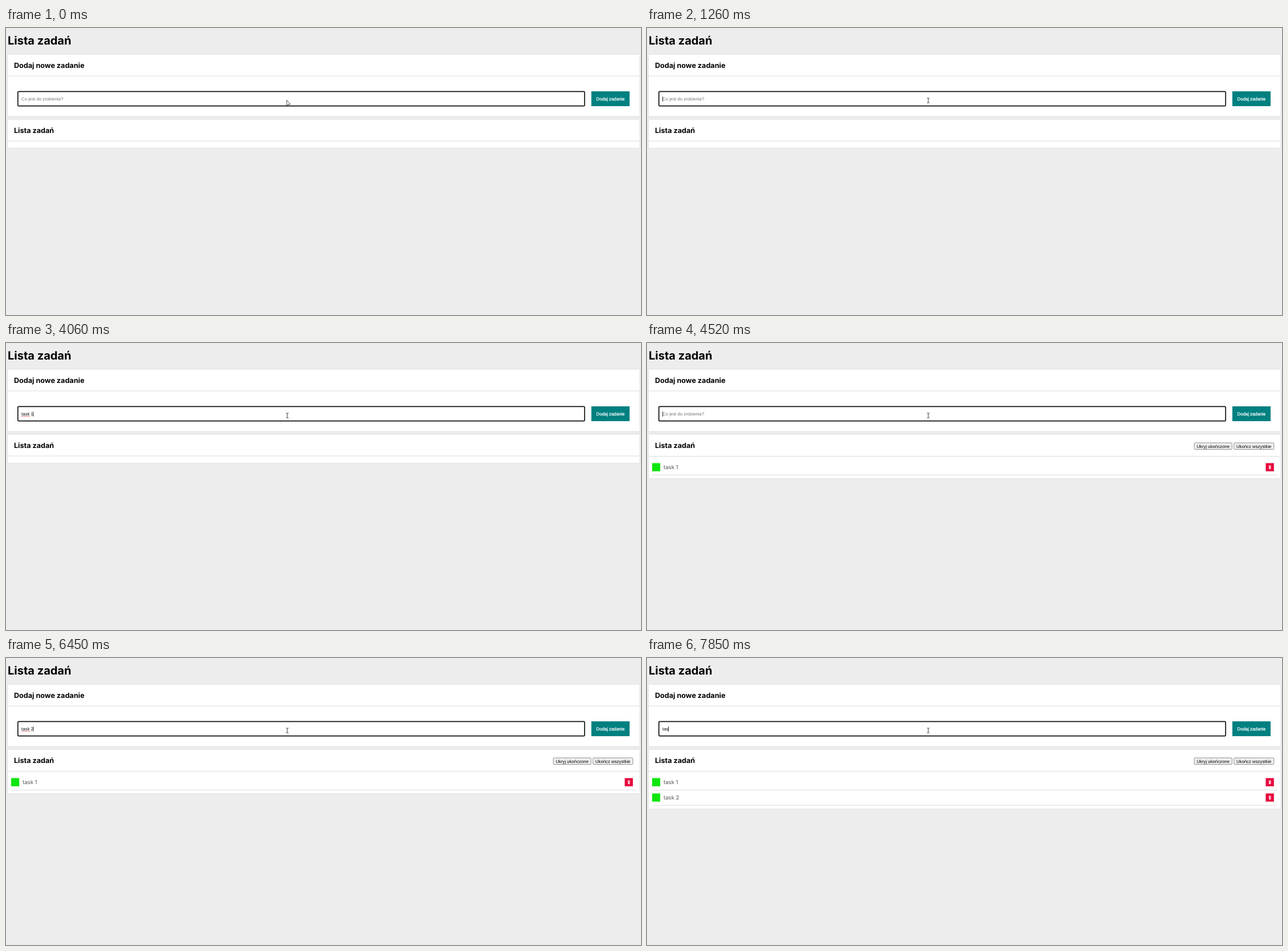
Write an HTML page that moves like this. It is 1113 px wide and 503 px high and loops after 8000 ms.

```html
<!DOCTYPE html>
<html lang="pl">
<head>
<meta charset="utf-8">
<style>
  html, body { margin: 0; width: 100%; height: 100%; overflow: hidden; background: #ededed; }
  svg { display: block; }
  text { white-space: pre; text-rendering: geometricPrecision; }
  .head { font: 700 12.6px Inter, sans-serif; }
  .form { font: 7.8px "Liberation Sans", Arial, sans-serif; }
  .task { font: 9.6px Inter, sans-serif; fill: #555; }
  .note { font: 7.2px "Open Sans", sans-serif; fill: #333; }
  .small { font-size: 6.7px; }
  .mid { text-anchor: middle; }
  .card { fill: #fff; filter: drop-shadow(0 0 1px #d4d4d4); }
  .rule { fill: #e2e2e2; }
  .grey { fill: #efefef; stroke: #767676; stroke-width: .8; }
  #dialog { filter: drop-shadow(0 1px 2px rgba(0, 0, 0, .45)); }
</style>
</head>
<body>
<svg width="1113" height="503" viewBox="0 0 1113 503">
  <text x="3" y="29" class="head" style="font-size:20px">Lista zadań</text>

  <rect class="card" x="3" y="46.5" width="1107.5" height="108"/>
  <text x="14" y="69.5" class="head">Dodaj nowe zadanie</text>
  <rect class="rule" x="3" y="83.4" width="1107.5" height="1.2"/>
  <rect id="field" fill="#fff"/>
  <text id="value" x="27" y="127" class="form"></text>
  <path id="spell" d="M27 128.5H42" stroke="#e33" stroke-width="1" stroke-dasharray="1.2 .8"/>
  <rect id="caret" y="120" width=".9" height="9" fill="#222"/>
  <rect x="1026" y="111" width="67" height="26" fill="teal"/>
  <text id="add" x="1059.5" y="127" class="form mid" fill="#fff" stroke="#fff">Dodaj zadanie</text>

  <rect id="listCard" class="card" x="3" y="160.5" width="1107.5"/>
  <g id="listHead">
    <text x="14" y="183.5" class="head">Lista zadań</text>
    <rect class="rule" x="3" y="197.4" width="1107.5" height="1.2"/>
  </g>
  <g id="tools" class="form mid">
    <rect class="grey" x="959.2" y="175" width="66.2" height="11.5" rx="1.5"/>
    <text x="992.2" y="183.5">Ukryj ukończone</text>
    <rect class="grey" x="1028.8" y="175" width="70" height="11.5" rx="1.5"/>
    <text x="1063.7" y="183.5">Ukończ wszystkie</text>
  </g>
  <g id="rows"></g>

  <g id="dialog">
    <rect x="426.5" y="-10" width="260.5" height="100" rx="2" fill="#fff"/>
    <g class="note">
      <text x="435.5" y="13.5">Możesz poruszać się po stronach przy użyciu kursora tekstowego. Aby</text>
      <text x="435.5" y="25">wyłączyć tę opcję, naciśnij F7.</text>
      <rect x="437.4" y="37.2" width="6.2" height="6.2" rx=".6" fill="none" stroke="#5f6368" stroke-width="1.2"/>
      <text x="452" y="42.6" class="small">Nie pytaj ponownie</text>
      <rect x="593.9" y="61.9" width="39.7" height="18.2" rx="2.5" fill="#fff" stroke="#1a73e8" stroke-width="1.2"/>
      <rect x="595.3" y="63.3" width="36.9" height="15.4" rx="1.5" fill="#1a73e8"/>
      <text x="613.7" y="73.4" class="small mid" style="fill:#fff;font-weight:700">Włącz</text>
      <rect x="638.5" y="62" width="39" height="18" rx="2" fill="#fff" stroke="#dadce0"/>
      <text x="658" y="73.4" class="small mid" style="fill:#4380d0">Anuluj</text>
    </g>
  </g>

  <path id="arrow" d="M492 126.5V136.3L494.3 134.2L495.5 136.8L496.9 136.2L495.8 133.6H498.2Z" fill="#fff" stroke="#222" stroke-width=".8"/>
  <path id="beam" d="M490.8 122.9H492.4L493 123.5L493.6 122.9H495.2M493 123.5V130.5M490.8 131.1H492.4L493 130.5L493.6 131.1H495.2" fill="none" stroke="#222" stroke-width=".9"/>
</svg>
<script>
const LOOP = 8000;
const $ = id => document.getElementById(id);
const show = (id, on) => $(id).style.display = on ? '' : 'none';
const set = (el, attrs) => { for (const k in attrs) el.setAttribute(k, attrs[k]); };

// start time, typed text, caret visible
const steps = [
  [0, '', 0], [1260, '', 1], [1800, '', 0],
  [2330, 't', 1], [2530, 'ta', 1], [2730, 'tas', 1], [2930, 'task', 1], [3460, 'task', 0],
  [3860, 'task ', 1], [4060, 'task 1', 1], [4520, '', 1], [4590, '', 0], [5120, '', 1],
  [5320, 't', 1], [5580, 'ta', 1], [5780, 'tas', 1], [5980, 'task', 1],
  [6180, 'task ', 1], [6450, 'task 2', 1], [6780, '', 1], [6980, '', 0],
  [7440, 't', 1], [7650, 'ta', 1], [7850, 'tas', 1]
];

const row = n => `<g transform="translate(0 ${(n - 1) * 26.9})">
  <rect x="9" y="210.5" width="14.2" height="14.3" fill="#0ee60e"/>
  <text x="29" y="221.2" class="task">task ${n}</text>
  <rect x="1084.5" y="210.5" width="14.3" height="14.3" fill="#e6063c"/>
  <path d="M1089.5 215.6H1094M1091 214.9H1092.5" stroke="#fff" stroke-width=".9"/>
  <path d="M1089.9 216.6H1093.6L1093.3 221H1090.2Z" fill="#fff"/>
  <path d="M1091.2 217.3V220.3M1092.3 217.3V220.3" stroke="#e6063c" stroke-width=".4"/>
  <rect class="rule" x="9" y="230.8" width="1095.5" height="1.2"/></g>`;
$('rows').innerHTML = row(1) + row(2);

function draw(t) {
  const [, text, caret] = steps.findLast(s => s[0] <= t);
  const count = t < 4520 ? 0 : t < 6780 ? 1 : 2;
  const focused = t < 70 || t >= 1260;

  set($('field'), focused
    ? { x: 20.8, y: 111.3, width: 993.4, height: 25.4, rx: 1.5, stroke: '#101010', 'stroke-width': 1.7 }
    : { x: 21, y: 111.5, width: 993, height: 25, rx: 0, stroke: '#ccc', 'stroke-width': 1.1 });
  $('value').textContent = text || 'Co jest do zrobienia?';
  set($('value'), { fill: text ? '#111' : '#757575' });
  set($('add'), { 'stroke-width': focused ? .25 : .08 });
  set($('caret'), { x: text ? 26.7 + $('value').getComputedTextLength() : 27 });
  show('caret', caret);
  show('spell', text.length > 4);

  set($('listCard'), { height: count ? 49.6 + count * 26.9 : 49.5 });
  set($('listHead'), { transform: `translate(0 ${count ? .6 : 0})` });
  show('tools', count);
  [...$('rows').children].forEach((r, i) => r.style.display = i < count ? '' : 'none');

  show('dialog', !focused);
  $('dialog').style.opacity = Math.min(1, (Math.floor((t - 70) / 66.7) + 1) / 4);
  show('arrow', t < 1260);
  show('beam', t >= 1260);
}

function tick() {
  draw(performance.now() % LOOP);
  requestAnimationFrame(tick);
}
tick();
</script>
</body>
</html>
```
